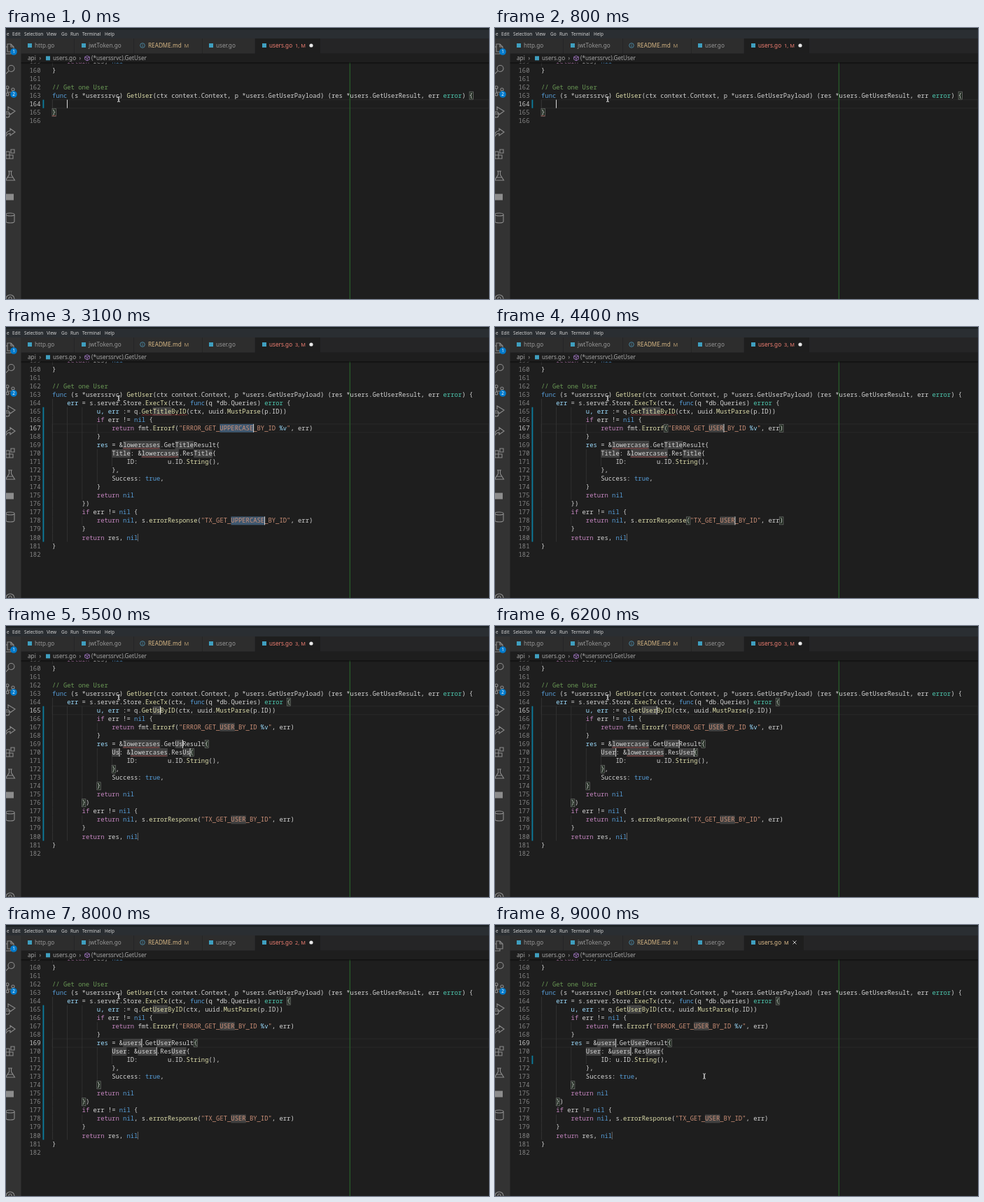
An HTML page for the animation above (9.1 s loop, 690 by 388 pixels).

```html
<!DOCTYPE html>
<html lang="en">
<head>
<meta charset="utf-8">
<title>Editor snippet</title>
<style>
  html, body { margin: 0; width: 100%; height: 100%; overflow: hidden; background: #1e1e1e; }
  svg { display: block; width: 690px; height: 388px; }
  text { white-space: pre; font: 8.2px "Noto Sans", sans-serif; }
  .code { font: 8.87px "Noto Sans Mono", monospace; }
  .menu { font-size: 6.4px; }
  .small { font-size: 7.4px; }
  .detail { font: 7.55px "Noto Sans Mono", monospace; }
  .match { fill: #18a3ff; font-weight: bold; }
</style>
</head>
<body>
<svg id="stage" viewBox="0 0 690 388"></svg>
<script>
const LOOP = 9100, CW = 5.322, LH = 12.05, LEFT = 66;
const EXPAND = 2400, SAVE = 8300;
const colX = col => LEFT + col * CW;
const lineY = n => 60.5 + (n - 160) * LH;

const esc = s => s.replace(/&/g, '&amp;').replace(/</g, '&lt;');
const rect = (x, y, w, h, fill, extra = '') =>
  `<rect x="${x}" y="${y}" width="${w}" height="${h}" fill="${fill}" ${extra}/>`;
const disc = (x, y, r, fill) => `<circle cx="${x}" cy="${y}" r="${r}" fill="${fill}"/>`;
const label = (x, y, s, fill, cls = '', extra = '') =>
  `<text x="${x}" y="${y}" fill="${fill}" class="${cls}" ${extra}>${s}</text>`;
const stroke = (d, color, width = 1, move = '0 0') =>
  `<path d="${d}" fill="none" stroke="${color}" stroke-width="${width}" transform="translate(${move})"/>`;

// Syntax colours
const RULES = [
  [/^\/\/.*/, '#6a9955'],
  [/^"[^"]*"/, '#ce9178'],
  [/^(func|nil|true)\b/, '#569cd6'],
  [/^(if|return)\b/, '#c586c0'],
  [/^error\b/, '#4ec9b0'],
  [/^(u, )?(err|res)(?= :?= )/, '#9cdcfe'],
  [/^\w+(?=\()/, '#dcdcaa'],
  [/^(\w+|\s+|.)/, '#d4d4d4'],
];
function paint(s) {
  let out = '';
  while (s) {
    const [re, color] = RULES.find(r => r[0].test(s));
    const word = s.match(re)[0];
    const body = esc(word).replace('%v', '<tspan fill="#9cdcfe">%v</tspan>');
    out += `<tspan fill="${color}">${body}</tspan>`;
    s = s.slice(word.length);
  }
  return out;
}

const HEAD = [
  [4, 'return res, nil'], [0, '}'], [0, ''], [0, '// Get one User'],
  [0, 'func (s *userssrvc) GetUser(ctx context.Context, p *users.GetUserPayload) (res *users.GetUserResult, err error) {'],
];
// ①②③ are the snippet's linked fields
const SNIPPET = [
  [8, 'u, err := q.Get②ByID(ctx, uuid.MustParse(p.ID))'],
  [8, 'if err != nil {'],
  [12, 'return fmt.Errorf("ERROR_GET_①_BY_ID %v", err)'],
  [8, '}'],
  [8, 'res = &③.Get②Result{'],
  [12, '②: &③.Res②{'],
  [16, 'ID:        u.ID.String(),'],
  [12, '},'],
  [12, 'Success: true,'],
  [8, '}'],
  [8, 'return nil'],
  [4, '})'],
  [4, 'if err != nil {'],
  [8, 'return nil, s.errorResponse("TX_GET_①_BY_ID", err)'],
  [4, '}'],
  [4, 'return res, nil'],
];
const FIELDS = [
  { mark: '①', hint: 'UPPERCASE', word: 'USER', from: EXPAND, keys: [3500, 3700, 3900, 4100],
    line: 167, pairs: ['167(', '167)', '178(', '178)'] },
  { mark: '②', hint: 'Title', word: 'User', from: 4700, keys: [5200, 5400, 5600, 5800],
    line: 165, pairs: ['164{', '176}', '169{', '174}', '170{', '172}'] },
  { mark: '③', hint: 'lowercases', word: 'users', from: 6500, keys: [6900, 7000, 7200, 7500, 7700],
    line: 169, pairs: ['164{', '176}', '169{', '174}'] },
];
const count = (keys, t) => keys.filter(k => t >= k).length;

function squiggle(col, n, len) {
  const zigs = Math.round(len * CW / 2.6);
  return stroke(`M${colX(col)} ${lineY(n) + 5.6}` + 'l1.3 -1.3l1.3 1.3'.repeat(zigs), '#c84040', .6);
}
const caret = (col, n) => rect(colX(col) - .3, lineY(n) - 6, 1, 12, '#d8d8d8');

function popup(x, y, w, rows) {
  let out = rect(x, y, w, rows.length * LH + 1.5, '#252526', 'stroke="#3a3a3a" stroke-width=".6"');
  out += rect(x + .5, y + .5, w - 1, LH, '#094771');
  rows.forEach(([icon, name, detail], i) => {
    const cy = y + 6.5 + i * LH;
    const text = name.replace(/\[(\w+)\]/g, '<tspan class="match">$1</tspan>');
    out += ICONS[icon](x + 7.5, cy) + label(x + 15.4, cy + 3, text, i ? '#d4d4d4' : '#fff', 'code');
    if (detail) out += label(x + w - 6.5, cy + 2.6, detail, i ? '#9a9a9a' : '#c5d0d8', 'detail', 'text-anchor="end"');
  });
  return out;
}
const ICONS = {
  snippet: (x, y) => stroke('M-3.5-4h7v8h-7z', '#c5c5c5', .9, `${x} ${y}`),
  struct: (x, y) => stroke('M-4-3.5h8v2.5h-8zM-4 1h3v3h-3zM1 1h3v3h-3zM-2.5-1v2M2.5-1v2', '#c5c5c5', .9, `${x} ${y}`),
  module: (x, y) => label(x, y + 2.8, '{}', '#c5c5c5', 'detail', 'text-anchor="middle"'),
  iface: (x, y) => disc(x - 3, y, 1.4, '#75beff') + stroke('M-2 0h3a1.8 1.8 0 1 0 3.6 0a1.8 1.8 0 1 0-3.6 0', '#75beff', 1, `${x} ${y}`),
};
const GOA = [
  ['snippet', '[goa]-[g]et', 'Generate GET method'],
  ['snippet', '[goa]-[g]ets', 'Generate GET ALL method'],
];
const USE = [
  ['struct', '[use]rs.GetUserResult', 'struct(...)'], ['module', '[use]rs'],
  ['module', '[use]rssrvc'], ['module', '[use]r'], ['struct', 'db.[Use]r'],
  ['iface', '[use]rs.Service'], ['module', '[use]r'], ['module', '[us]ag[e]record'],
  ['module', '[us]ag[e]recordsummary'], ['module', '[u]til[s]'],
];

function editor(t) {
  const open = t >= EXPAND, saved = t >= SAVE;
  const typed = 'goag'.slice(0, count([1100, 1300, 1600, 1800], t));
  const active = FIELDS.filter(f => t >= f.from).pop();
  const shift = saved ? 0 : 4;
  const lines = HEAD.concat(open
    ? [[4, 'err = s.server.Store.ExecTx(ctx, func(q *db.Queries) error {'],
       ...SNIPPET.map(([c, s]) => [c + shift, saved ? s.replace(/: +u/, ': u') : s])]
    : [[4, typed]], [[0, '}'], [0, '']]);
  const current = active ? active.line : 164;
  let under = rect(LEFT, lineY(current) - 6, 624, LH, 'none', 'stroke="#292929"');
  let text = '', over = '';
  const plain = {};

  lines.forEach(([indent, raw], i) => {
    const n = 159 + i, y = lineY(n);
    let s = '';
    for (const ch of raw) {
      const f = FIELDS.find(f => f.mark === ch);
      if (!f) { s += ch; continue; }
      const k = count(f.keys, t), value = k ? f.word.slice(0, k) : f.hint;
      const col = indent + s.length, selected = f === active && !k;
      under += rect(colX(col), y - 6, value.length * CW, 12, selected ? '#3f5870' : '#414141');
      if (f === active) over += caret(col + value.length, n);
      const broken = f.mark === '③' ? t < 7700 : f.mark === '②' && n === 165 && !k;
      if (broken) over += n === 165 ? squiggle(col - 3, n, value.length + 7) : squiggle(col, n, value.length);
      s += value;
    }
    plain[n] = [indent, s];
    for (let c = 0; c < indent; c += 4) under += rect(colX(c), y - 6, .6, LH, '#3c3c3c');
    text += label(49.5, y + 3, n, n === current ? '#c6c6c6' : '#858585', 'code', 'text-anchor="end"');
    text += label(colX(indent), y + 3, paint(s), '#d4d4d4', 'code');
  });

  const picked = active && !count(active.keys, t);
  const pairs = active ? (picked ? [] : active.pairs) : ['163{', '165}'];
  for (const p of pairs) {
    const n = +p.slice(0, 3), [indent, s] = plain[n];
    under += rect(colX(indent + s.indexOf(p[3])), lineY(n) - 5.5, CW, 11, '#1f2a1f', 'stroke="#808080" stroke-width=".6"');
  }

  if (open) {
    const [indent, s] = plain[180];
    over += rect(colX(indent + s.length) - .3, lineY(180) - 5.5, .8, 11, '#777');
    const [a, b] = saved ? [171, 171] : [165, 180];
    under += rect(52.5, lineY(a) - 6, 1.8, (b - a + 1) * LH, '#0c7d9d');
  } else {
    under += rect(52.5, lineY(164) - 6, 1.8, LH, '#0c7d9d');
    over += caret(4 + typed.length, 164);
    over += typed ? squiggle(4, 164, typed.length) : squiggle(0, 165, 1);
    if (typed.length > 2) {
      over += disc(71, 106, 2.7, '#ffcc00') + rect(69.8, 109, 2.4, 2, '#d0a800') + popup(108, 114.5, 274, GOA);
    }
  }
  if (t >= 7000 && t < 7800) over += popup(176, 175, 275, USE);
  return under + text + rect(490.7, 49, 1.2, 339, '#29602b') + over;
}

const badge = (y, s) => disc(11, y, 4.8, '#007acc') + label(11, y + 2.2, s, '#fff', 'menu', 'text-anchor="middle"');
const SIDE = [
  [30, 'M2-7h5l4 4v7h-9zM7-7v4h4M2-3h-4v10h9v-3'],
  [60, 'M3-2a4.5 4.5 0 1 1 9 0a4.5 4.5 0 1 1-9 0M4.3 1.2L-1 6.5'],
  [90, 'M0-5a2 2 0 1 1 4 0a2 2 0 1 1-4 0M0 5a2 2 0 1 1 4 0a2 2 0 1 1-4 0M8-2a2 2 0 1 1 4 0a2 2 0 1 1-4 0M2-3v6M10 0q0 2-3 2h-5'],
  [120, 'M3-2v-5l10 6-7 5M-1 3a3 3 0 1 1 6 0v2a3 3 0 1 1-6 0zM-3 3h10'],
  [150, 'M6-6l7 5-7 5v-3q-5 0-7 6q0-9 7-10z'],
  [181, 'M0-4h5v10h-5zM0 1h10v5h-10M7-7h5v5h-5z'],
  [212, 'M3-7h6M4.5-7v5l-5 8h13l-5-8v-5M2 2h8'],
  [272, 'M0-5a6 2 0 1 1 12 0a6 2 0 1 1-12 0v10a6 2 0 0 0 12 0v-10'],
  [388, 'M0 0a6 6 0 1 1 12 0M4-1a2 2 0 1 1 4 0a2 2 0 1 1-4 0'],
];
const goMark = (x, y) => rect(x - 3, y - 3, 6, 6, '#3f9fbf');

function chrome(t) {
  const saved = t >= SAVE, tint = saved ? '#e2c08d' : '#f07f72', end = saved ? 441 : 449;
  let out = rect(0, 0, 690, 16, '#2a2e32') + rect(0, 0, 690, 2.5, '#1b2022');
  [['e', 1], ['Edit', 9], ['Selection', 26], ['View', 58], ['Go', 79], ['Run', 92], ['Terminal', 109], ['Help', 141]]
    .forEach(([s, x]) => out += label(x, 10.6, s, '#d4d4d4', 'menu'));

  out += rect(21, 15, 669, 21.5, '#252526') + rect(21, 36.5, 669, 12.8, '#1e1e1e');
  [[21, 76], [98, 84], [183, 97], [281, 74.5]].forEach(([x, w]) => out += rect(x, 15, w, 21.5, '#2d2d2d'));
  out += rect(356, 15, end - 356, 21.5, '#1e1e1e');
  [[34, 41, 'http.go'], [111, 118, 'jwtToken.go'], [293, 300, 'user.go']]
    .forEach(([i, x, s]) => out += goMark(i, 25) + label(x, 28, s, '#979797'));
  out += stroke('M-3.3 0a3.3 3.3 0 1 1 6.6 0a3.3 3.3 0 1 1-6.6 0M0-.5v2.3M0-2v.8', '#519aba', .8, '195 25');
  out += label(203, 28, 'README.md', '#d8b885') + label(254.5, 27.7, 'M', '#b59a70', 'small');
  out += goMark(369, 25) + label(376, 28, 'users.go', tint);
  const errors = t < 1100 ? 1 : t < EXPAND ? 2 : t < 6600 ? 3 : 2;
  out += label(413, 27.7, saved ? 'M' : errors + ', M', tint, 'small');
  out += saved ? stroke('M-2.5-2.5l5 5M2.5-2.5l-5 5', '#d4d4d4', .9, '428 25') : disc(436, 25, 2.6, '#e8e8e8');

  const grey = '#a9a9a9';
  out += label(31, 46.3, 'api', grey) + label(47.5, 46, '›', grey) + goMark(60, 43.3) + label(67, 46.3, 'users.go', grey)
    + label(104.5, 46, '›', grey) + label(122, 46.3, '(*userssrvc).GetUser', grey);
  out += stroke('M0-3.5l3.3 1.7v3.6l-3.3 1.7-3.3-1.7v-3.6zM-3.3-1.8l3.3 1.7 3.3-1.7M0 0v3.5', '#b180d7', .8, '116 43.3');
  out += rect(21, 49.2, 669, 1, '#000', 'opacity=".5"') + rect(21, 50.2, 669, 1.2, '#000', 'opacity=".25"');

  out += rect(0, 15, 21.5, 373, '#333');
  SIDE.forEach(([y, d]) => out += stroke(d, '#8c8c8c', 1.1, `0 ${y}`));
  out += rect(0, 237.5, 11, 9, '#8c8c8c');
  return out + (saved ? '' : badge(34, 1)) + badge(95, 2);
}

function pointer(t) {
  const p = Math.min(1, Math.max(0, (t - 8400) / 500)), e = p * p * (3 - 2 * p);
  return stroke('M-2-3.7q2 0 2 1v5.4q0 1-2 1M2-3.7q-2 0-2 1v5.4q0 1 2 1', '#e4e4e4', .9,
    `${161 + 138 * e} ${102 + 114.5 * e}`);
}

const stage = document.getElementById('stage'), start = performance.now();
let shown = -1;
function tick() {
  const t = Math.floor((performance.now() - start) % LOOP / 100) * 100;
  if (t !== shown) {
    shown = t;
    stage.innerHTML = rect(0, 0, 690, 388, '#1e1e1e') + editor(t) + chrome(t) + pointer(t);
  }
  requestAnimationFrame(tick);
}
tick();
</script>
</body>
</html>
```
